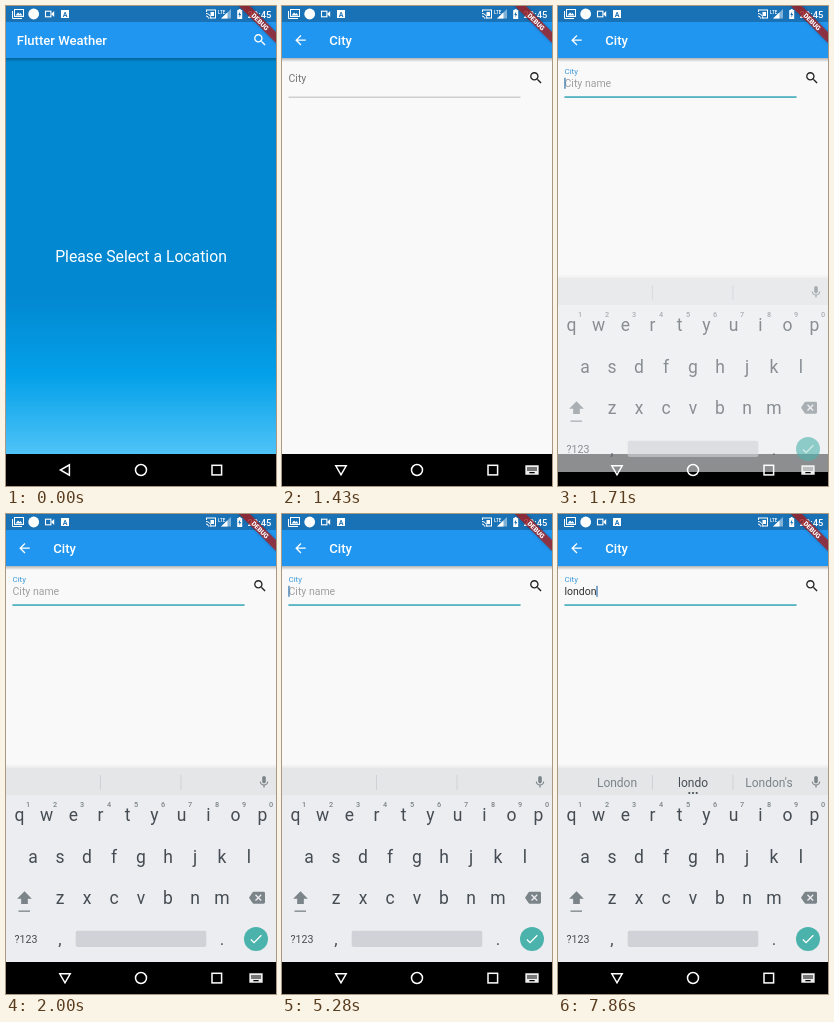
These frames come from a looping animation (270 px wide and 480 px high, 8 s). An HTML page with a canvas:

```html
<!DOCTYPE html>
<html lang="en">
<head>
<meta charset="utf-8">
<title>Weather city search</title>
<style>
  html, body { margin: 0; width: 100%; height: 100%; overflow: hidden; background: #000; }
  canvas { display: block; width: 270px; height: 480px; }
</style>
</head>
<body>
<canvas></canvas>
<script>
const canvas = document.querySelector('canvas');
const ctx = canvas.getContext('2d');
const dpr = window.devicePixelRatio || 1;
canvas.width = 270 * dpr;
canvas.height = 480 * dpr;

const LOOP = 8000;
const KEY = '#454c53', DIM = '#7b8489';

// 24 x 24 icon outlines
const ICON = {
  search: 'M15.5 14h-.79l-.28-.27A6.47 6.47 0 0 0 16 9.5 6.5 6.5 0 1 0 9.5 16c1.61 0 3.09-.59 4.23-1.57l.27.28v.79l5 4.99L20.49 19l-4.99-5zm-6 0C7.01 14 5 11.99 5 9.5S7.01 5 9.5 5 14 7.01 14 9.5 11.99 14 9.5 14z',
  arrow: 'M20 11H7.83l5.59-5.59L12 4l-8 8 8 8 1.41-1.41L7.83 13H20z',
  mic: 'M12 14c1.66 0 3-1.34 3-3V5c0-1.66-1.34-3-3-3S9 3.34 9 5v6c0 1.66 1.34 3 3 3zm5.3-3c0 3-2.54 5.1-5.3 5.1S6.7 14 6.7 11H5c0 3.41 2.72 6.23 6 6.72V21h2v-3.28c3.28-.48 6-3.3 6-6.72z',
  erase: 'M22 3H7c-.69 0-1.23.35-1.59.88L0 12l5.41 8.11c.36.53.9.89 1.59.89h15c1.1 0 2-.9 2-2V5c0-1.1-.9-2-2-2zm-3 12.59L17.59 17 14 13.41 10.41 17 9 15.59 12.59 12 9 8.41 10.41 7 14 10.59 17.59 7 19 8.41 15.41 12z',
  check: 'M9 16.17L4.83 12l-1.42 1.41L9 19 21 7l-1.41-1.41z',
  shift: 'M12 2L1 13h6v8h10v-8h6z',
  keyboard: 'M2 5h20v14H2zM5 8v2h2V8zm3 0v2h2V8zm3 0v2h2V8zm3 0v2h2V8zm3 0v2h2V8zM5 11v2h2v-2zm3 0v2h2v-2zm3 0v2h2v-2zm3 0v2h2v-2zm3 0v2h2v-2zM8 15v2h8v-2z'
};
for (const name in ICON) ICON[name] = new Path2D(ICON[name]);

function icon(name, x, y, size, color) {
  ctx.save();
  ctx.translate(x - size / 2, y - size / 2);
  ctx.scale(size / 24, size / 24);
  ctx.fillStyle = color;
  ctx.fill(ICON[name], 'evenodd');
  ctx.restore();
}

function rect(x, y, w, h, color) {
  ctx.fillStyle = color;
  ctx.fillRect(x, y, w, h);
}

function text(str, x, y, size, color, weight = 400, align = 'left') {
  ctx.font = `${weight} ${size}px Roboto, sans-serif`;
  ctx.textAlign = align;
  ctx.fillStyle = color;
  ctx.fillText(str, x, y);
}

function disc(x, y, r, color) {
  ctx.beginPath();
  ctx.arc(x, y, r, 0, 7);
  ctx.fillStyle = color;
  ctx.fill();
}

function poly(points, color) {
  ctx.beginPath();
  points.forEach(([x, y]) => ctx.lineTo(x, y));
  ctx.closePath();
  ctx.fillStyle = color;
  ctx.fill();
}

function strokeRect(x, y, w, h, width = 1) {
  ctx.strokeStyle = '#fff';
  ctx.lineWidth = width;
  ctx.strokeRect(x, y, w, h);
}

function fade(y0, y1, ...stops) {
  const g = ctx.createLinearGradient(0, y0, 0, y1);
  stops.forEach(([at, color]) => g.addColorStop(at, color));
  rect(0, y0, 270, y1 - y0, g);
}

function statusBar() {
  rect(0, 0, 270, 16, '#1971b6');
  // notifications
  strokeRect(8.5, 3.5, 9, 7);
  ctx.beginPath();
  ctx.moveTo(6.5, 5); ctx.lineTo(6.5, 12.5); ctx.lineTo(16, 12.5);
  ctx.stroke();
  poly([[9.5, 9.5], [12, 6.5], [13.5, 8], [14.5, 7], [16.5, 9.5]], '#fff');
  disc(27.7, 8, 5.4, '#fff');
  strokeRect(39.5, 5.2, 5.4, 5.6, 1.1);
  poly([[45, 8], [48.2, 5], [48.2, 11]], '#fff');
  rect(55, 4, 8, 8, '#fff');
  text('A', 59, 10.5, 7, '#1971b6', 700, 'center');
  // system
  strokeRect(200.5, 4, 9, 8);
  rect(199.5, 6, 4, 7, '#1971b6');
  for (const r of [2.5, 5]) {
    ctx.beginPath();
    ctx.arc(200, 12.5, r, -Math.PI / 2, 0);
    ctx.stroke();
  }
  rect(204.5, 6, 3.5, 4, '#fff');
  text('LTE', 212, 7.6, 4.6, '#fff', 500);
  poly([[215, 12.5], [225, 12.5], [225, 3]], 'rgba(255,255,255,.45)');
  poly([[215, 12.5], [221.5, 12.5], [221.5, 6.4]], '#fff');
  rect(231.2, 4, 5, 9, '#fff');
  rect(232.7, 3, 2, 1, '#fff');
  poly([[234.2, 5.5], [232.2, 9], [233.5, 9], [233.2, 11.5], [235.2, 8], [234, 8]], '#1971b6');
  text('22:45', 265.3, 11.7, 9.4, '#fff', 500, 'right');
}

function debugBanner() {
  ctx.save();
  ctx.translate(270, 0);
  ctx.rotate(Math.PI / 4);
  ctx.shadowColor = 'rgba(0,0,0,.4)';
  ctx.shadowBlur = 3 * dpr;
  rect(-27, 18.4, 54, 7.8, 'rgba(183,28,28,.72)');
  ctx.shadowColor = 'transparent';
  text('DEBUG', 0, 24.7, 6.6, '#fff', 900, 'center');
  ctx.restore();
}

function appBar(title, x) {
  fade(52, 56, [0, 'rgba(0,0,0,.28)'], [1, 'rgba(0,0,0,0)']);
  rect(0, 16, 270, 36, '#2196f0');
  text(title, x, 39.1, 13.1, '#fff', 500);
}

function navIcons(keyboardOpen) {
  ctx.strokeStyle = '#fff';
  ctx.lineWidth = 1.5;
  ctx.beginPath();
  const back = keyboardOpen
    ? [[53.8, 459.8], [64.2, 459.8], [59, 468.8]]
    : [[63.4, 458.8], [63.4, 469.2], [54.4, 464]];
  back.forEach(p => ctx.lineTo(...p));
  ctx.closePath();
  ctx.stroke();
  ctx.beginPath();
  ctx.arc(135, 464, 5.5, 0, 7);
  ctx.stroke();
  strokeRect(206, 459.3, 9.6, 9.6, 1.5);
  if (keyboardOpen) icon('keyboard', 250, 464, 16, '#eee');
}

function homePage() {
  fade(52, 448, [0, '#0288d1'], [.6, '#0288d1'], [.8, '#03a0e9'], [1, '#4fc3f7']);
  text('Please Select a Location', 135, 255.6, 15.75, '#fff', 400, 'center');
  appBar('Flutter Weather', 10.7);
  icon('search', 254, 34, 15.7, '#fff');
}

function cityPage(focus, typed, cursor) {
  rect(0, 52, 270, 396, '#f9f9f9');
  appBar('City', 47.3);
  icon('arrow', 18.5, 34.2, 15.7, '#fff');
  icon('search', 254, 72, 15.7, '#222');
  text('City', 6.5, 75.6 - 7.8 * focus, 10.5 - 2.6 * focus, focus ? '#3c9adb' : '#777');
  rect(6.5, 90.7, 232, .9, '#b4b4b4');
  if (focus) {
    const w = 232 * focus;
    rect(122.5 - w / 2, 90.3, w, 1.5, '#3dafc0');
  }
  if (focus === 1) text(typed || 'City name', 6.5, 80.9, 10.5, typed ? '#333' : '#a0a0a0');
  if (cursor) {
    ctx.font = '400 10.5px Roboto, sans-serif';
    rect(6.3 + ctx.measureText(typed).width, 71.8, 1.3, 11, '#3f7fb5');
  }
}

function keyboard(alpha, offset, words) {
  ctx.save();
  ctx.globalAlpha = alpha;
  ctx.translate(0, offset);
  fade(250, 254, [0, 'rgba(0,0,0,0)'], [1, 'rgba(0,0,0,.06)']);
  rect(0, 254, 270, 194, '#ecedf0');
  rect(0, 254, 270, 27, '#e5e6e8');
  rect(94, 261, 1, 15, '#cfd1d4');
  rect(174.5, 261, 1, 15, '#cfd1d4');
  words.forEach((w, i) => text(w, 59 + 76 * i, 273, 12, i === 1 ? KEY : DIM, 400, 'center'));
  if (words.length) for (const x of [131.3, 135, 138.7]) disc(x, 279, 1.1, KEY);
  icon('mic', 258, 268, 14.5, DIM);

  const row = (keys, x, y) =>
    [...keys].forEach((k, i) => text(k, x + 27 * i, y, 17.5, KEY, 400, 'center'));
  row('qwertyuiop', 13.5, 307.3);
  row('asdfghjkl', 27, 348.5);
  row('zxcvbnm', 54, 389.7);
  [...'1234567890'].forEach((d, i) => text(d, 22 + 27 * i, 292.7, 7.3, DIM, 500, 'center'));
  icon('shift', 18.5, 384, 16, DIM);
  rect(12.5, 396.5, 11.5, 1.3, DIM);
  icon('erase', 251, 383.7, 16, DIM);
  text('?123', 20, 429, 10.6, KEY, 400, 'center');
  text(',', 54, 430.5, 17, KEY, 400, 'center');
  text('.', 216, 430.5, 17, KEY, 400, 'center');
  ctx.beginPath();
  ctx.roundRect(69.7, 416.7, 130.6, 16.4, 2);
  ctx.fillStyle = '#d0d2d8';
  ctx.fill();
  disc(250, 425, 12, '#4bb3ab');
  icon('check', 250, 425, 15.5, '#fff');
  ctx.restore();
}

// [start, keyboard alpha, keyboard offset, label focus]
const RISE = [[0, 0, 0, 0], [1570, .2, 36, .5], [1710, .6, 18, 1], [1860, .9, 1, 1], [2000, 1, 0, 1]];

// [start, typed text, suggestions]
const TYPING = [
  [0, '', []],
  [7280, 'l', ['La', 'l', 'Lol']],
  [7430, 'lo', ['Lol', 'lo', 'Look']],
  [7570, 'lon', ['Lol', 'lo', 'Look']],
  [7710, 'londo', ['London', 'londo', "London's"]],
  [7860, 'london', ['London', 'londo', "London's"]]
];

const current = (steps, t) => steps.filter(s => s[0] <= t).pop();

function cursorOn(t) {
  if (t < 1710 || (t >= 1860 && t < 2280)) return false;
  return t < 1860 || t >= 7280 || (t - 2280) % 1000 < 580;
}

function draw(t) {
  ctx.setTransform(dpr, 0, 0, dpr, 0, 0);
  rect(0, 448, 270, 32, '#000');
  const [, alpha, offset, focus] = current(RISE, t);
  const [, typed, words] = current(TYPING, t);
  if (t < 280) homePage();
  else cityPage(focus, typed, cursorOn(t));
  statusBar();
  debugBanner();
  if (alpha) keyboard(alpha, offset, words);
  navIcons(t >= 1430);
}

const start = performance.now();
function tick() {
  draw((performance.now() - start) % LOOP);
  requestAnimationFrame(tick);
}
tick();
</script>
</body>
</html>
```
